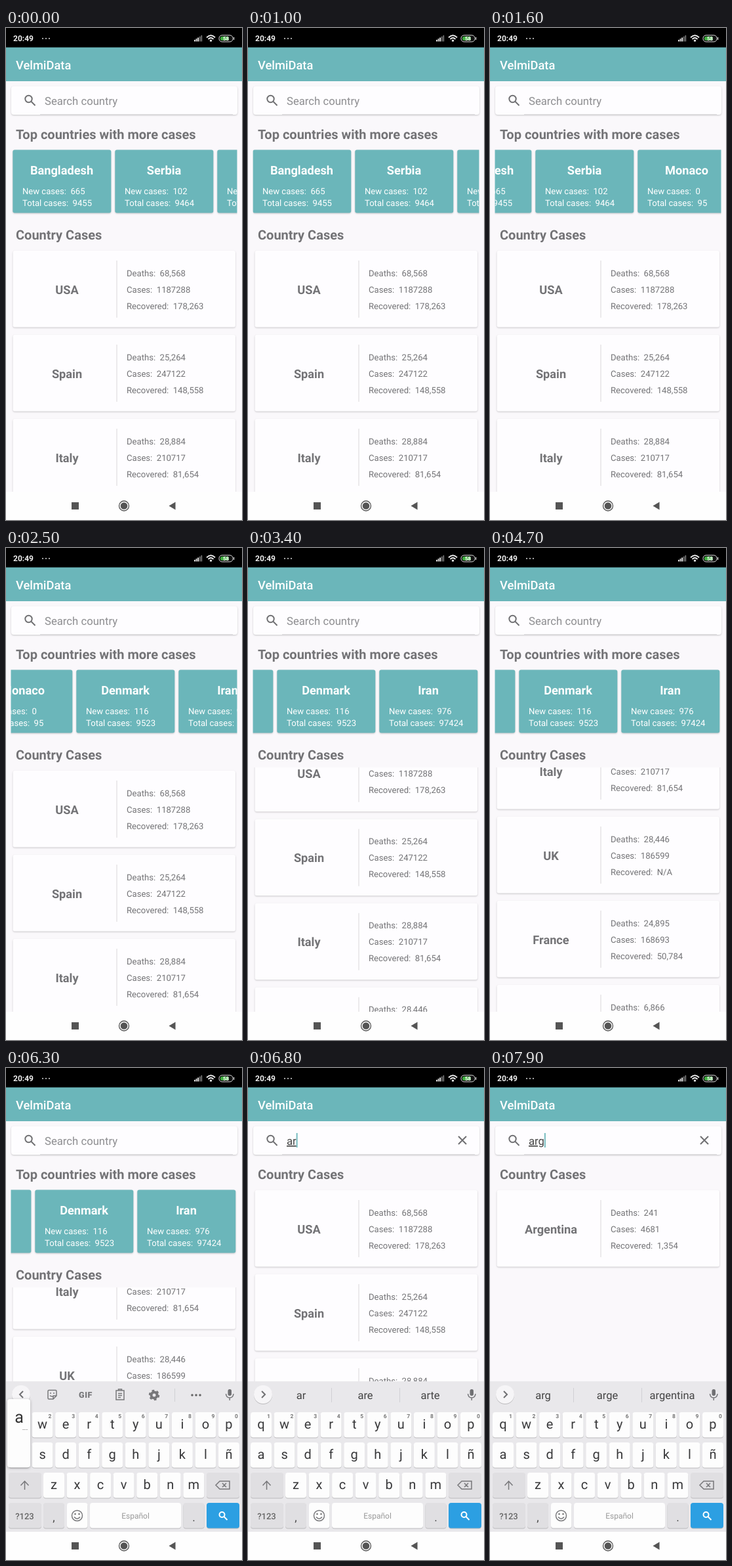
Write an HTML page that moves like this. It is 360x749 px and loops after 8 s.

```html
<!DOCTYPE html>
<html lang="en">
<head>
<meta charset="utf-8">
<title>Case list</title>
<style>
  html, body { margin: 0; width: 100%; height: 100%; overflow: hidden; background: #faf8fb; }
  svg { display: block; width: 360px; height: 749px; }
  text { font-family: Roboto, sans-serif; white-space: pre; text-rendering: geometricPrecision; }
  .card { filter: drop-shadow(0 1px 1px #0003); }
  .key { filter: drop-shadow(0 1px 0.5px #0003); }
  .line { fill: none; stroke: #707073; stroke-width: 2; }
  .thin { fill: none; stroke: #77777a; stroke-width: 1.5; }
</style>
</head>
<body>
<svg id="stage" viewBox="0 0 360 749"></svg>
<script>
const LOOP = 8000, STEP = 100;
const GREY = '#737376', TEAL = '#6bb6ba';

const text = (x, y, s, size, fill = GREY, more = '') =>
  `<text x="${x}" y="${y}" font-size="${size}" fill="${fill}" ${more}>${s}</text>`;
const rect = (x, y, w, h, fill, r = 0, more = '') =>
  `<rect x="${x}" y="${y}" width="${w}" height="${h}" fill="${fill}" rx="${r}" ${more}/>`;
const circle = (x, y, r, fill, more = '') =>
  `<circle cx="${x}" cy="${y}" r="${r}" fill="${fill}" ${more}/>`;
const path = (d, more = 'class="line"') => `<path d="${d}" ${more}/>`;
const group = (id, body) => `<g id="${id}">${body}</g>`;
const MID = 'text-anchor="middle" ', BOLD = 'font-weight="700"', THIN = 'class="thin"';

// Country data
const top5 = [['Bangladesh', 665, 9455], ['Serbia', 102, 9464], ['Monaco', 0, 95],
  ['Denmark', 116, 9523], ['Iran', 976, 97424]];
const main = [['USA', '68,568', 1187288, '178,263'], ['Spain', '25,264', 247122, '148,558'],
  ['Italy', '28,884', 210717, '81,654'], ['UK', '28,446', 186599, 'N/A'],
  ['France', '24,895', 168693, '50,784'], ['Germany', '6,866', 165664, '132,700']];
const lists = {
  all: main,
  a: main.slice(0, 3),
  ar: [['Saudi Arabia', '184', 27011, '4,134'], ['Belarus', '99', 16705, '3,196'],
    ['Qatar', '12', 15551, '1,664']],
  arg: [['Argentina', '241', 4681, '1,354']]
};

const topCard = ([name, fresh, total], i) => {
  const x = 10.3 + 156 * i;
  return rect(x, 185.6, 150, 95.8, TEAL, 3, 'class="card"') +
    text(x + 74.7, 223, name, 18.2, '#fff', MID + BOLD) +
    text(x + 14.7, 253, `New cases:  ${fresh}`, 13.1, '#fff') +
    text(x + 14.7, 270.7, `Total cases:  ${total}`, 13.1, '#fff');
};
const countryCard = ([name, deaths, cases, recovered], i) => {
  const y = 339 + 128 * i;
  return rect(10.5, y, 339.5, 116.5, '#fefdff', 3, 'class="card"') +
    rect(168.5, y + 15, 1, 87, '#d9d8da') +
    text(93, y + 65.5, name, 18.2, GREY, MID + BOLD) +
    [`Deaths:  ${deaths}`, `Cases:  ${cases}`, `Recovered:  ${recovered}`]
      .map((s, k) => text(184, y + 38.5 + 25 * k, s, 13.1)).join('');
};

// Android chrome
const statusBar = rect(0, 0, 360, 29.5, '#000') +
  text(11, 20.3, '20:49', 12, '#eee', BOLD) +
  [56, 61, 66].map(x => circle(x, 16, 1, '#ddd')).join('') +
  [0, 1, 2, 3, 4].map(i => rect(287 + 2.6 * i, 18 - 1.7 * i, 1.8, 2.5 + 1.7 * i, i < 3 ? '#eee' : '#777')).join('') +
  path('M306 14.5Q312.5 8 319 14.5M308.5 17Q312.5 13 316.5 17', 'fill="none" stroke="#eee" stroke-width="1.8"') +
  circle(312.5, 19.2, 1.6, '#eee') +
  rect(325, 11, 21, 10, '#111', 4.5, 'stroke="#ddd"') +
  rect(327, 13, 13, 6, '#3fae3f', 2.5) + rect(347, 14, 1.2, 4, '#ddd') +
  text(335.5, 19, '58', 8, '#fff', MID + BOLD);

const navBar = rect(0, 706, 360, 43, '#fefefe') + rect(100, 722, 11, 11, '#555') +
  circle(180, 727.5, 7.5, 'none', 'stroke="#555" stroke-width="1.3"') + circle(180, 727.5, 5.3, '#555') +
  path('M248.5 727.5L258.5 721.5V733.5Z', 'fill="#555"');

const searchBox = rect(8, 88.5, 345, 43.5, '#fefdff', 4, 'class="card"') +
  rect(52, 131, 294, 1, '#dddcdf') +
  circle(34.5, 108, 5.2, 'none', 'class="line"') + path('M38.5 112L44.5 118') +
  text(59, 117, 'Search country', 16.7, '#8d8d90', 'id="hint"') +
  text(59, 117, '', 16.7, '#444', 'id="query" text-decoration="underline"') +
  rect(0, 99, 1.8, 22, TEAL, 0, 'id="cursor"') +
  path('M321 104L333 116M333 104L321 116', 'id="clear" class="line"');

// Keyboard
const PITCH = 35.55, colX = i => 20 + PITCH * i;
const LIGHT = '#fdfdfd', DARK = '#e0dfe2';
const keyBox = (x, y, w, fill) => rect(x, y, w, 38.5, fill, 4, 'class="key"');
const letters = (row, y, from) => [...row].map((c, i) => {
  const x = colX(i) + from;
  return keyBox(x - 16, y, 32, LIGHT) + text(x, y + 25, c, 20, '#38383a', MID);
}).join('');
const keys = letters('qwertyuiop', 524, 0) +
  [...'1234567890'].map((c, i) => text(colX(i) + 11.5, 533, c, 8.5, '#777', MID + BOLD)).join('') +
  letters('asdfghjklñ', 570, 0) + letters('zxcvbnm', 616, 53) +
  keyBox(4, 616, 50, DARK) + path('M28.5 642V630M22.5 635.5L28.5 629L34.5 635.5', THIN) +
  keyBox(306, 616, 50, DARK) +
  path('M320 635L326 629H341V641H326ZM330 632L336 638M336 632L330 638', THIN) +
  keyBox(4, 662, 50, DARK) + text(28.5, 686.5, '?123', 13, '#666', MID + 'font-weight="500"') +
  keyBox(57, 662, 32, DARK) + text(73, 690, ',', 17, '#444', MID) +
  keyBox(93, 662, 31.5, LIGHT) + circle(108.5, 681.5, 8, 'none', THIN) +
  circle(105.5, 679, 1.2, '#666') + circle(111.5, 679, 1.2, '#666') +
  path('M104 683.5Q108.5 689 113 683.5', THIN) +
  keyBox(128, 662, 139, LIGHT) + text(197.5, 686, 'Español', 12, '#999', MID) +
  keyBox(270.5, 662, 32, DARK) + text(286.5, 690, '.', 17, '#444', MID) +
  keyBox(306, 662, 50, '#2c9fe2') +
  circle(329.5, 680, 4, 'none', 'stroke="#fff" stroke-width="2"') +
  path('M332.5 683L337.5 688', 'stroke="#fff" stroke-width="2"');

const sticker = path('M65.5 490.5H75.5Q77 490.5 77 492V499L72 504H65.5Q64 504 64 502.5V492Q64 490.5 65.5 490.5ZM77 499H73.5Q72 499 72 500.5V504M67 498.5Q70 501.5 73 498.5', THIN) +
  circle(68, 495, 1, '#77777a') + circle(73, 495, 1, '#77777a');
const gear = circle(226, 498, 4.5, 'none', 'stroke="#77777a" stroke-width="4"') +
  circle(226, 498, 7, 'none', 'stroke="#77777a" stroke-width="2.5" stroke-dasharray="3.665"');
const tools = path('M26 492L21 497L26 502') + sticker +
  text(121.5, 501.5, 'GIF', 12.5, '#77777a', MID + 'font-weight="900" letter-spacing="0.6"') +
  path('M168 491H180V505H168ZM171.5 491V489H176.5V491M171 495.5H177M171 498.5H177M171 501.5H175', THIN) + gear +
  rect(257, 488, 1, 20, '#d0d0d4') + [284, 290, 296].map(x => circle(x, 498, 1.8, '#666')).join('');
const suggestions = path('M21 492L26 497L21 502') +
  [127, 231].map(x => rect(x, 487, 1, 22, '#d0d0d4')).join('') +
  [81, 179, 278].map(x => text(x, 504, '', 16.5, '#444', MID + 'class="word"')).join('');
const mic = rect(338.5, 489, 5.5, 10, '#707073', 2.7) +
  path('M335.5 496Q336 502 341.2 502Q346.5 502 347 496M341.2 502V506', THIN);
const popup = rect(-18, 0, 35, 104, LIGHT, 4, 'style="filter:drop-shadow(0 1px 2px #0004)"') +
  text(0, 35.5, '', 25, '#333', MID + 'id="popChar"') + text(9, 47, '...', 11, '#555', MID + 'id="popMore"');
const keyboard = rect(0, 477, 360, 229, '#e9e8eb') + circle(23, 497, 14, '#f6f5f7', 'class="key"') +
  group('tools', tools) + group('suggest', suggestions) + mic + keys + group('popup', popup);

const heading = (y, s) => text(15, y, s, 20, GREY, BOLD);
const stage = document.getElementById('stage');
stage.innerHTML = `<defs>
  <clipPath id="rowClip">${rect(7.5, 180, 345, 108, '#000')}</clipPath>
  <clipPath id="listClip">${rect(0, 334, 360, 530, '#000')}</clipPath></defs>` +
  rect(0, 0, 360, 749, '#faf8fb') +
  group('topPart', heading(168.5, 'Top countries with more cases') +
    `<g clip-path="url(#rowClip)">${group('row', top5.map(topCard).join(''))}</g>`) +
  group('casesPart', heading(322, 'Country Cases') +
    `<g clip-path="url(#listClip)">${Object.keys(lists).map(k =>
      group('list-' + k, lists[k].map(countryCard).join(''))).join('')}</g>`) +
  rect(0, 29, 360, 52, TEAL) + text(15, 63, 'VelmiData', 18.3, '#fff', 'font-weight="500"') +
  searchBox + statusBar + group('keyboard', keyboard) + navBar;

const el = id => document.getElementById(id);
const show = (id, on) => el(id).style.display = on ? '' : 'none';
const move = (id, x, y) => el(id).setAttribute('transform', `translate(${x} ${y})`);

// Smooth monotone curve through [time, value] points, at rest at both ends
function track(pts, t) {
  const last = pts.length - 1;
  if (t <= pts[0][0]) return pts[0][1];
  if (t >= pts[last][0]) return pts[last][1];
  const slope = i => (pts[i + 1][1] - pts[i][1]) / (pts[i + 1][0] - pts[i][0]);
  const tangent = i => i === 0 || i === last ? 0 : 2 * slope(i - 1) * slope(i) / (slope(i - 1) + slope(i));
  const i = pts.findIndex(p => p[0] > t) - 1;
  const [t0, v0] = pts[i], [t1, v1] = pts[i + 1], d = t1 - t0, u = (t - t0) / d;
  return v0 + (v1 - v0) * u * u * (3 - 2 * u) +
    d * u * (1 - u) * (tangent(i) * (1 - u) - tangent(i + 1) * u);
}

// Latest value whose start time has passed
const at = (steps, t) => steps.reduce((v, [start, next]) => t >= start ? next : v, steps[0][1]);

const rowScroll = [[900, 0], [1600, 97], [2500, 371], [2900, 434]];
const listScroll = [[3100, 0], [3900, 210], [4700, 314]];
const typed = [[0, ''], [6400, 'a'], [6800, 'ar'], [7300, 'arg']];
const filter = [[0, 'all'], [6600, 'a'], [7000, 'ar'], [7600, 'arg']];
const words = [[0, []], [6400, ['a', 'al', 'así']], [6800, ['ar', 'are', 'arte']],
  [7600, ['arg', 'arge', 'argentina']]];
const pressed = [[0, null], [6300, ['a', 0, 504]], [6400, null], [6700, ['r', 3, 458]],
  [6800, null], [7000, ['g', 4, 504]], [7100, null]];

function draw(t) {
  const query = at(typed, t), list = at(filter, t), guess = at(words, t), key = at(pressed, t);
  const filtered = list !== 'all';

  move('row', -track(rowScroll, t), 0);
  show('topPart', !filtered);
  move('casesPart', 0, filtered ? -153 : 0);
  for (const k in lists) show('list-' + k, k === list);
  move('list-all', 0, -track(listScroll, t));

  show('hint', !query);
  show('clear', query);
  el('query').textContent = query;
  el('cursor').setAttribute('x', 59 + (query ? el('query').getComputedTextLength() : 0));
  show('cursor', query || (t >= 5600 && t < 6200));

  show('keyboard', t >= 5700);
  move('keyboard', 0, track([[5700, 229], [6000, 0]], t));
  show('tools', !guess.length);
  show('suggest', guess.length);
  document.querySelectorAll('.word').forEach((w, i) => w.textContent = guess[i] || '');

  show('popup', key);
  if (key) {
    move('popup', colX(key[1]), key[2]);
    el('popChar').textContent = key[0];
    show('popMore', key[0] === 'a');
  }
}

function frame() {
  const t = performance.now() % LOOP;
  draw(t - t % STEP);
  requestAnimationFrame(frame);
}
frame();
</script>
</body>
</html>
```
